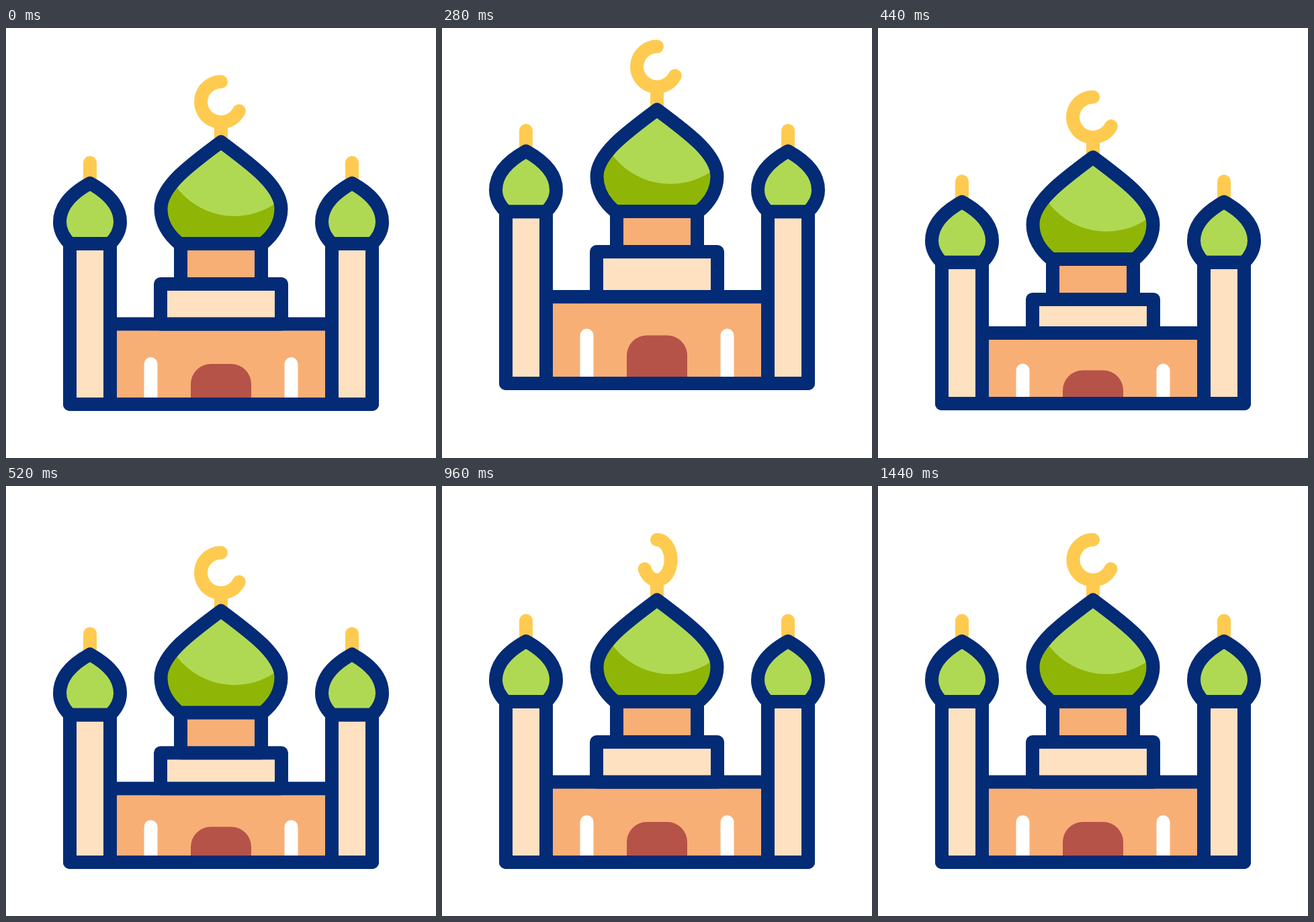
Write an HTML page that moves like this. It is 640x640 px and loops after 1.48 s.

```html
<!DOCTYPE html>
<html lang="en">
<head>
<meta charset="utf-8">
<title>Bouncing mosque</title>
<style>
  html, body { margin: 0; width: 100%; height: 100%; overflow: hidden; background: #fff; }
  svg { display: block; width: 100%; height: 100%; }
  .gold { fill: none; stroke: #fecb50; stroke-width: 20; stroke-linecap: round; stroke-linejoin: round; }
  .line { stroke: #032b76; stroke-width: 20; stroke-linecap: round; stroke-linejoin: round; }
  .none { fill: none; }
  .peach { fill: #f7af76; }
  .cream { fill: #fde1c1; }
  .light { fill: #b0d953; }
  .dark { fill: #8fb606; }
  .door { fill: #b55349; }
  .window { fill: none; stroke: #fff; stroke-width: 20; stroke-linecap: round; }
</style>
</head>
<body>
<svg viewBox="0 0 640 640">
  <defs>
    <path id="onion" d="M258 321C242 308 230.500 290 230.500 269C230.500 236 272 205 320 169.500C368 205 409.500 236 409.500 269C409.500 290 398 308 382 321Z"/>
    <clipPath id="inside"><use href="#onion"/></clipPath>
    <g id="cap">
      <path class="gold" d="M125 200.500V224"/>
      <path class="line light" d="M95 321C85 311 80 301 80 289C80 261 105 242 125 231C145 242 170 261 170 289C170 301 165 311 155 321Z"/>
    </g>
  </defs>
  <path id="moon" class="gold"/>
  <path id="wall" class="line peach"/>
  <path id="windows" class="window"/>
  <path id="door" class="door"/>
  <path id="block" class="line cream"/>
  <g id="dome">
    <path class="line peach" d="M260 321H380V381H260Z"/>
    <use href="#onion" class="dark"/>
    <circle class="light" cx="340" cy="172" r="108" clip-path="url(#inside)"/>
    <use href="#onion" class="line none"/>
  </g>
  <path id="towers" class="line cream"/>
  <path id="base" class="line none"/>
  <g id="caps">
    <use href="#cap"/>
    <use href="#cap" x="390"/>
  </g>
</svg>
<script>
  const LOOP = 1480, STEP = 40;
  const el = id => document.getElementById(id);
  const draw = (id, d) => el(id).setAttribute('d', d);
  const shift = (id, y) => el(id).setAttribute('transform', `translate(0 ${y})`);

  // Eased value between [time, value] keys
  function ease(t, keys) {
    if (t <= keys[0][0]) return keys[0][1];
    for (let i = 1; i < keys.length; i++) {
      const [t0, a] = keys[i - 1], [t1, b] = keys[i];
      if (t < t1) {
        const p = (t - t0) / (t1 - t0);
        return a + (b - a) * p * p * (3 - 2 * p);
      }
    }
    return keys[keys.length - 1][1];
  }

  // Leap to `up`, land squashed by `down`, settle
  const hop = (t, up, down) => ease(t, [[60, 0], [260, -up], [460, down], [610, 0]]);

  function render(t) {
    const base = 560 + hop(t, 32, 0);
    const wall = 440.5 + hop(t, 42, 15);
    const opening = hop(t, 44, 11);
    const dome = hop(t, 50, 25);
    const cap = hop(t, 50, 30);
    const lag = ease(t, [[160, 0], [280, -4.5], [360, -3.5], [520, 3], [640, 0]]);
    const moon = dome + lag;
    const turn = ease(t, [[660, 1], [1060, -1], [1460, 1]]) || 0.01;

    draw('moon', `M320 ${80 + moon}A${30 * Math.abs(turn)} 30 0 1 ${turn > 0 ? 0 : 1} ` +
      `${320 + 26.8 * turn} ${123.5 + moon}M320 ${142 + moon}V${166 + dome}`);
    draw('wall', `M155 ${wall}H485V${base}H155Z`);
    draw('windows', [215.5, 424.5].map(x => `M${x} ${500 + opening}V${base - 8}`).join(''));
    draw('door', `M275 ${base}V${530 + opening}a30 30 0 0 1 30 -30h30a30 30 0 0 1 30 30V${base}Z`);
    draw('block', `M230 ${381 + dome}H410V${wall}H230Z`);
    draw('towers', [95, 485].map(x => `M${x} ${321 + cap}h60V${base}h-60Z`).join(''));
    draw('base', `M95 ${base}H545`);
    shift('dome', dome);
    shift('caps', cap);
  }

  function tick() {
    const t = performance.now() % LOOP;
    render(Math.floor(t / STEP) * STEP);
    requestAnimationFrame(tick);
  }
  tick();
</script>
</body>
</html>
```
